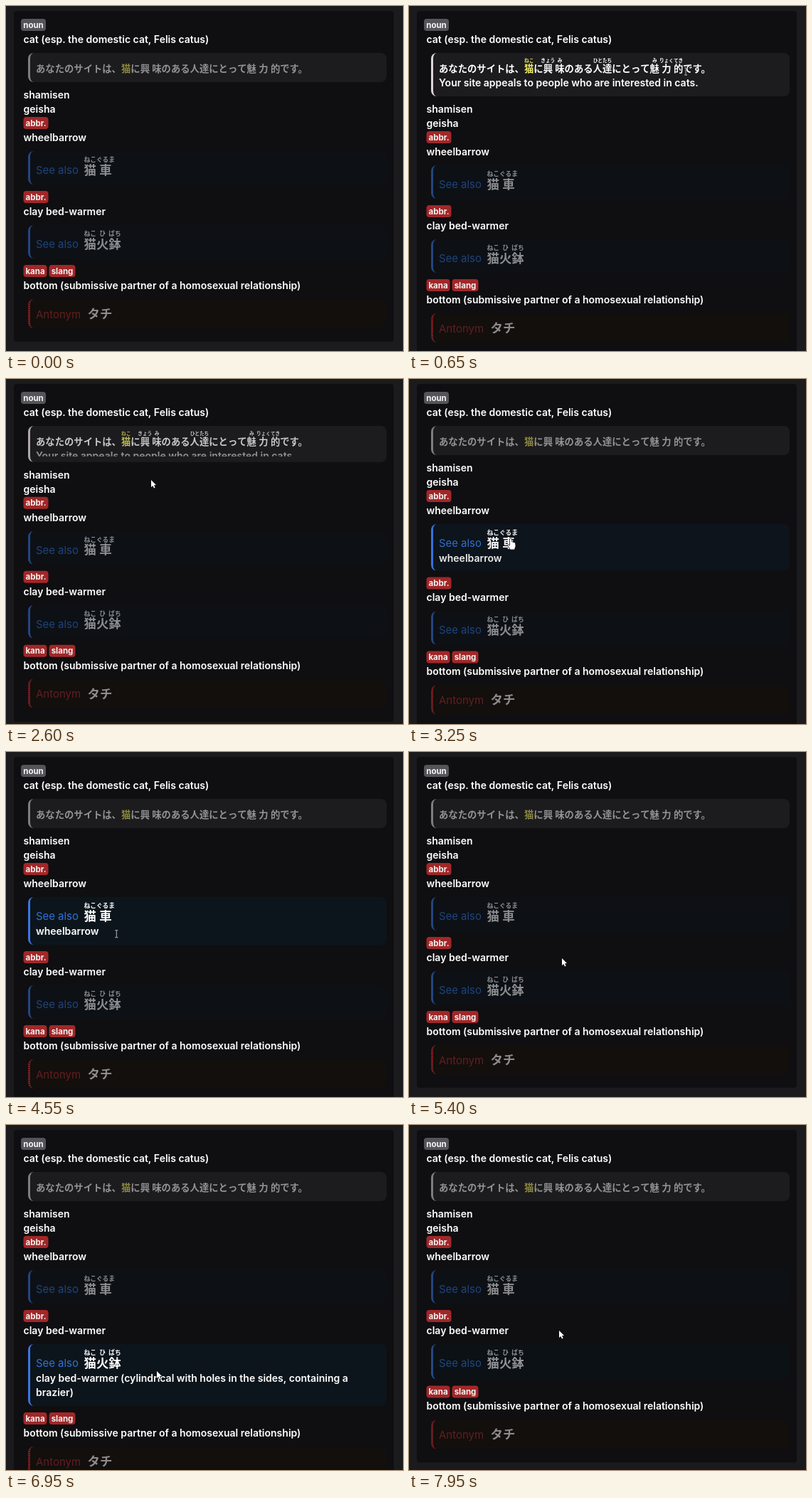
These frames come from a looping animation (558x485 px, 8 s). An HTML page with a canvas:

```html
<!DOCTYPE html>
<html lang="en">
<head>
<meta charset="utf-8">
<title>Dictionary entry</title>
<style>
html, body { margin: 0; width: 100%; height: 100%; overflow: hidden; background: #1b1a1c; }
canvas { display: block; }
</style>
</head>
<body>
<canvas id="stage" width="558" height="485"></canvas>
<script>
const ctx = document.getElementById('stage').getContext('2d');
const LOOP = 8000, STEP = 50, FADE = 300, DIM = 0.52;
const LATIN = 'Inter, "Noto Sans", sans-serif';
const CJK = '"Noto Sans CJK JP", "Noto Sans CJK", sans-serif';
const BODY = '600 14px ' + LATIN;
const WHITE = '#fff', GRAY = '#555458', RED = '#a12728';
const LEFT = 24.5, CARD_X = 31, CARD_W = 504, INSET = 42;

const clamp = v => Math.min(1, Math.max(0, v));
const mix = (a, b, k) => a + (b - a) * k;
const smooth = k => k * k * (3 - 2 * k);

// cubic-bezier(.25, .1, .25, 1)
function ease(x) {
  x = clamp(x);
  if (x === 0 || x === 1) return x;
  const curve = (s, a, b) => 3 * (1 - s) * (1 - s) * s * a + 3 * (1 - s) * s * s * b + s * s * s;
  let lo = 0, hi = 1;
  for (let i = 0; i < 24; i++) {
    const mid = (lo + hi) / 2;
    if (curve(mid, 0.25, 0.25) < x) lo = mid; else hi = mid;
  }
  return curve(lo, 0.1, 1);
}

const openness = (t, on, off) => ease((t - on) / FADE) - ease((t - off) / FADE);

function text(str, x, y, font, color, alpha = 1, align = 'left') {
  ctx.font = font;
  ctx.fillStyle = color;
  ctx.globalAlpha = alpha;
  ctx.textAlign = align;
  ctx.fillText(str, x, y);
  ctx.globalAlpha = 1;
}

function round(x, y, w, h, r, color, alpha = 1) {
  ctx.globalAlpha = alpha;
  ctx.fillStyle = color;
  ctx.beginPath();
  ctx.roundRect(x, y, w, h, r);
  ctx.fill();
  ctx.globalAlpha = 1;
}

// kanji with readings above; a wide reading may overhang plain neighbours
function ruby(parts, x, y, size, lift, alpha, rubyAlpha = alpha) {
  parts.forEach(([base, reading = ''], i) => {
    const width = base.length * size;
    const pad = Math.max(0, (reading.length * size / 2 - width) / 2);
    const color = base === '猫' && parts === SENTENCE ? '#efec62' : WHITE;
    const hasReading = part => part && part[1];
    if (hasReading(parts[i - 1])) x += pad;
    text(base, x, y, `bold ${size}px ${CJK}`, color, alpha);
    text(reading, x + width / 2, y - lift, `bold ${size / 2}px ${CJK}`, color, rubyAlpha, 'center');
    x += width;
    if (hasReading(parts[i + 1])) x += pad;
  });
}

const SENTENCE = [
  ['あなたのサイトは、'], ['猫', 'ねこ'], ['に'], ['興', 'きょう'], ['味', 'み'], ['のある'],
  ['人達', 'ひとたち'], ['にとって'], ['魅', 'み'], ['力', 'りょく'], ['的', 'てき'], ['です。']
];

function tags(y, color, labels, x = LEFT) {
  const font = '700 11.5px ' + LATIN;
  for (const label of labels) {
    ctx.font = font;
    const w = Math.round(ctx.measureText(label).width) + 6;
    round(x, y, w, 17, 4, color);
    text(label, x + w / 2, y + 12.5, font, '#f4f2f2', 1, 'center');
    x += w + 3;
  }
  return y + 34;
}

function line(str, y) {
  text(str, LEFT, y, BODY, WHITE);
  return y + 14;
}

// rounded box with a coloured left edge
function card(y, h, bg, edge, alpha, striped) {
  const inner = { x: 5, y: 8 };
  round(CARD_X, y, CARD_W, h, 8, bg);
  ctx.save();
  ctx.beginPath();
  ctx.roundRect(CARD_X, y, CARD_W, h, 8);
  ctx.clip();
  ctx.beginPath();
  ctx.rect(CARD_X, y, CARD_W, h);
  ctx.roundRect(CARD_X + 3, y, CARD_W, h, [inner, 0, 0, inner]);
  ctx.clip('evenodd');
  ctx.fillStyle = edge;
  ctx.globalAlpha = alpha;
  if (striped) {
    for (let dy = 0; dy < h; dy += 3) ctx.fillRect(CARD_X, y + dy, 9, 2);
    ctx.globalAlpha = alpha / 2;
  }
  ctx.fillRect(CARD_X, y, 9, h);
  ctx.restore();
}

// lines revealed as a card opens
function notes(lines, y, top, h, p) {
  ctx.save();
  ctx.beginPath();
  ctx.rect(CARD_X, top, CARD_W, h - 8);
  ctx.clip();
  const alpha = mix(DIM, 1, p) * mix(0.4, 1, p);
  lines.forEach((str, i) => text(str, INSET, y + 20 * i, BODY, WHITE, alpha));
  ctx.restore();
}

function example(y, p, translation) {
  const h = 41 + 20 * p, a = mix(DIM, 1, p);
  card(y, h, '#1c1b1e', '#dcd6d6', a);
  ruby(SENTENCE, INSET, y + 27, 13.33, 14, a, a * clamp(p * 2));
  notes([translation], y + 47, y, h, p);
  return y + h;
}

function seeAlso(y, p, words, meaning) {
  const h = 47 + 20 * meaning.length * p, a = mix(DIM, 1, p);
  card(y, h, '#0d1116', '#3b76e2', a);
  round(CARD_X + 3, y, CARD_W - 3, h, 8, '#0d151c', p);
  text('See also', INSET, y + 32, '400 14.9px ' + LATIN, '#2f72d6', a);
  ruby(words, 109.5, y + 32.5, 17.4, 17.5, a);
  notes(meaning, y + 53, y, h, p);
  return y + h;
}

function antonym(y) {
  card(y, 41, '#120f0d', '#b42a30', DIM, true);
  text('Antonym', INSET, y + 26.5, '400 15px ' + LATIN, '#b02a2e', DIM);
  ruby([['タチ']], 114.5, y + 27, 17.4, 0, DIM);
  return y + 41;
}

// pointer stops: arrival time, x, y, time of rest
const STOPS = [
  [50, 560, 118, 0], [650, 389, 92, 250], [1200, 235, 94, 150], [1450, 235, 106, 250],
  [2000, 122, 108, 0], [2300, 311, 112, 0], [2600, 204, 142, 0], [3250, 143, 225, 150],
  [4200, 62, 255, 50], [4750, 206, 256, 250], [5300, 215, 290, 150], [5800, 211, 340, 500],
  [6600, 212, 346, 350], [7250, 62, 367, 150], [7950, 211, 289, 50]
];

function pointerAt(t) {
  const i = STOPS.findLastIndex(stop => stop[0] <= t);
  const [start, x, y, rest] = STOPS[i], next = STOPS[i + 1] || STOPS[i];
  const k = smooth(clamp((t - start - rest) / (next[0] - start - rest || 1)));
  return [mix(x, next[1], k), mix(y, next[2], k)];
}

function shape(points, edge) {
  ctx.beginPath();
  points.forEach(([x, y]) => ctx.lineTo(x, y));
  ctx.closePath();
  ctx.lineJoin = 'round';
  ctx.lineWidth = 1.4;
  ctx.strokeStyle = edge;
  ctx.stroke();
  ctx.fillStyle = WHITE;
  ctx.fill();
}

const CURSORS = {
  arrow() {
    shape([[0, 0], [0, 10], [2.3, 8], [4, 11.5], [5.6, 10.8], [4, 7.3], [7, 7]], '#111');
  },
  beam() {
    const path = new Path2D('M-2 -5H2M0 -5V5M-2 5H2');
    for (const [color, width] of [['#222', 2], ['#bbb', 0.9]]) {
      ctx.strokeStyle = color;
      ctx.lineWidth = width;
      ctx.stroke(path);
    }
  },
  hand() {
    shape([[-1, 0], [1, 0], [1.2, 4], [6, 5.5], [6.5, 10], [5, 14.5], [-0.5, 14.5],
      [-4, 9], [-3, 8], [-1, 9.5]], '#222');
  }
};

// the cursor shape follows from what lies under the pointer
function cursorKind(x, y, tops, open) {
  if (open[0] > 0 && x < 535 && y > tops[0] && y < tops[0] + 60) return 'beam';
  for (const i of [1, 2]) {
    const dy = y - tops[i];
    if (open[i] === 0 || dy < 0) continue;
    if (dy < 40 && x > 109 && x < 162) return 'hand';
    if (dy > 40 && dy < 43 + 20 * i) return 'beam';
  }
  return 'arrow';
}

function draw(t) {
  const open = [openness(t, 70, 2510), openness(t, 3050, 5030), openness(t, 5500, 7742)];
  const tops = [];
  const at = y => { tops.push(y); return y; };

  ctx.fillStyle = '#1b1a1c';
  ctx.fillRect(0, 0, 558, 485);
  round(11, 7, 534, 465 + 20 * (open[0] + open[1] + 2 * open[2]), 4, '#0f0e11');

  let y = tags(18, GRAY, ['noun'], 21);
  y = line('cat (esp. the domestic cat, Felis catus)', y);
  y = example(at(y), open[0], 'Your site appeals to people who are interested in cats.');

  y = line('shamisen', y + 23);
  y = line('geisha', y + 6);
  y = tags(y - 8, RED, ['abbr.']);
  y = line('wheelbarrow', y);
  y = seeAlso(at(y), open[1], [['猫', 'ねこ'], ['車', 'ぐるま']], ['wheelbarrow']);

  y = tags(y + 9, RED, ['abbr.']);
  y = line('clay bed-warmer', y);
  y = seeAlso(at(y), open[2], [['猫', 'ねこ'], ['火', 'ひ'], ['鉢', 'ばち']],
    ['clay bed-warmer (cylindrical with holes in the sides, containing a', 'brazier)']);

  y = tags(y + 9, RED, ['kana', 'slang']);
  y = line('bottom (submissive partner of a homosexual relationship)', y);
  antonym(y);

  if (t < STOPS[0][0]) return;
  const [px, py] = pointerAt(t);
  ctx.save();
  ctx.translate(px, py);
  CURSORS[cursorKind(px, py, tops, open)]();
  ctx.restore();
}

function tick() {
  const t = performance.now() % LOOP;
  draw(Math.floor(t / STEP) * STEP);
  requestAnimationFrame(tick);
}
tick();
</script>
</body>
</html>
```
